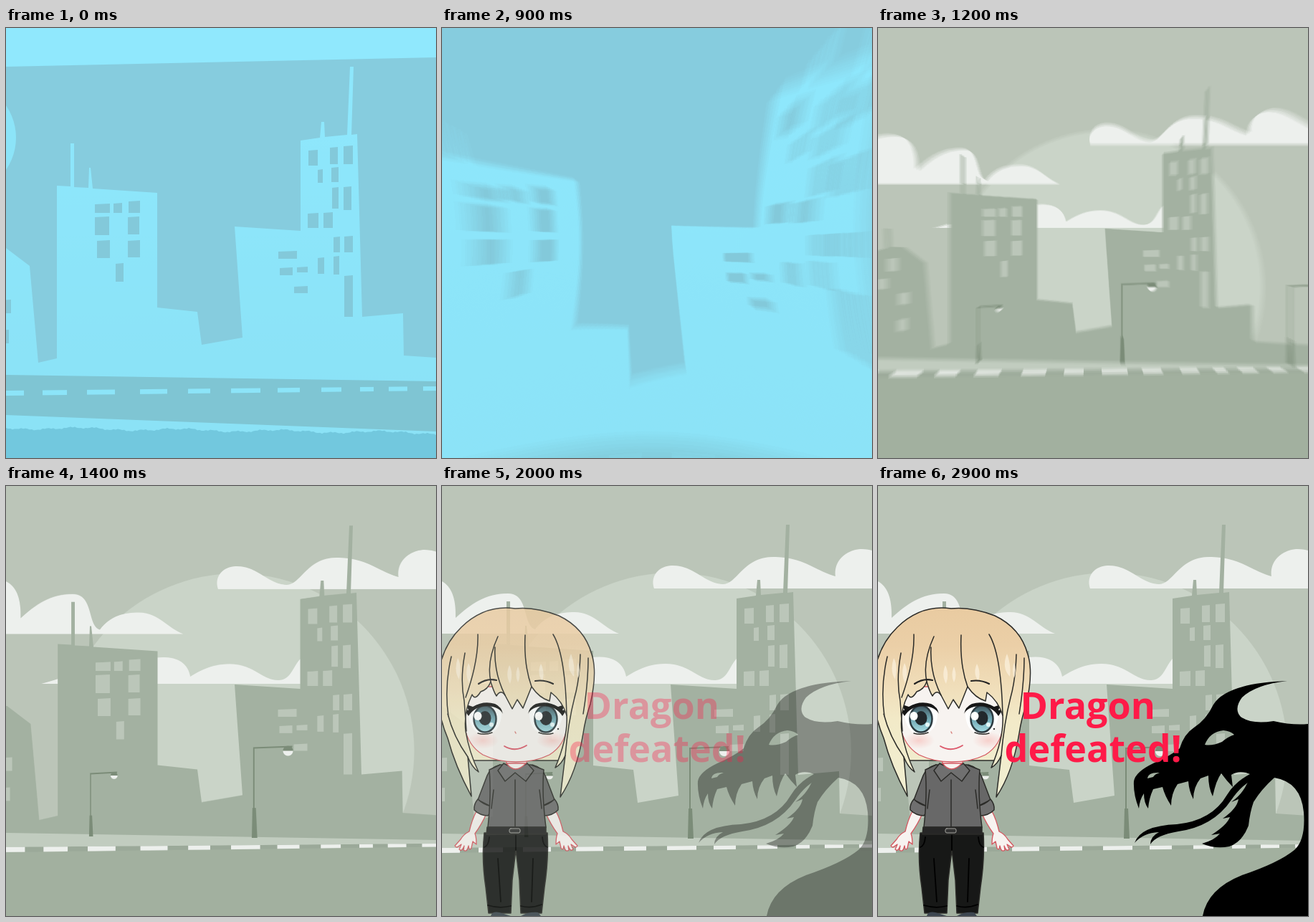
Animation of 600x600 px, one loop 3000 ms. Source, as an HTML page with a canvas:

```html
<!DOCTYPE html>
<html lang="en">
<head>
<meta charset="utf-8">
<title>Dragon defeated</title>
<style>
  html, body { margin: 0; width: 100%; height: 100%; overflow: hidden; background: #bbc5b8; }
  canvas, svg { position: absolute; left: 0; top: 0; width: 100%; height: 100%; display: block; }
  svg text { font: 700 52px "Open Sans", "Noto Sans", sans-serif; fill: #ff1a48; }
  #hero { stroke-linejoin: round; stroke-linecap: round; }
  .line { fill: none; stroke: #2b2b28; stroke-width: 1.5; }
  .ink { stroke: #2b2b28; stroke-width: 1.5; }
  .skin { fill: #f7f3f0; stroke: #d4565f; stroke-width: 1.3; }
</style>
</head>
<body>
<canvas id="stage" width="600" height="600"></canvas>
<svg viewBox="0 0 600 600">
  <defs>
    <linearGradient id="hair" gradientUnits="userSpaceOnUse" x1="0" y1="170" x2="0" y2="434">
      <stop offset="0" stop-color="#e9cba1"/>
      <stop offset=".2" stop-color="#ebcfa7"/>
      <stop offset=".42" stop-color="#f0deba"/>
      <stop offset=".6" stop-color="#f2eac8"/>
      <stop offset="1" stop-color="#f1efd2"/>
    </linearGradient>
    <linearGradient id="iris" x1="0" y1="0" x2="0" y2="1">
      <stop offset="0" stop-color="#40565e"/>
      <stop offset=".5" stop-color="#6fa6b2"/>
      <stop offset="1" stop-color="#a5dbe2"/>
    </linearGradient>
    <radialGradient id="blush">
      <stop offset="0" stop-color="#f6b9b4" stop-opacity=".6"/>
      <stop offset="1" stop-color="#f6b9b4" stop-opacity="0"/>
    </radialGradient>
    <g id="eye">
      <path d="M-24 -8Q-18 -22 0 -23Q18 -22 23 -6Q22 14 8 20H-10Q-21 12 -24 -8Z" fill="#fff"/>
      <ellipse rx="15.5" ry="18.5" fill="url(#iris)" stroke="#2c3a40" stroke-width="2.5"/>
      <ellipse cy="-1" rx="8.5" ry="10" fill="#22282c"/>
      <path d="M-10 20Q0 23 10 19" class="line"/>
      <path d="M25 -7Q20 -17 3 -18Q-14 -18 -23 -4L-29 -13L-23 -12L-26 -20L-17 -17Q-2 -26 14 -21Q23 -17 25 -7Z" fill="#161616"/>
    </g>
    <g id="shine" fill="#fff">
      <ellipse cx="-10" cy="-4" rx="5.5" ry="6"/>
      <circle cx="9" cy="8" r="3" fill="#e4f7f8"/>
    </g>
    <g id="arm">
      <path class="skin" d="M48 454Q42 465 38 482Q30 486 26 493L18 502Q20 506 24 502L27 500L24 507Q28 511 31 502L30 508Q35 512 37 502Q38 510 41 505L43 496L48 500Q48 490 46 485Q56 471 62 457Z"/>
      <path class="ink" fill="#676767" d="M81 389Q67 393 63 404L50 438L68 447L72 425Z"/>
      <path class="ink" fill="#6f6f6f" d="M50 437Q44 444 45 452Q53 460 64 460Q69 456 69 447Q58 445 50 437Z"/>
    </g>
  </defs>

  <g id="hero">
    <path fill="url(#hair)" class="ink" d="M15 250H195L168 383H40Z"/>
    <path class="skin" d="M90 378V400H118V378Z"/>
    <use href="#arm"/>
    <use href="#arm" transform="matrix(-1 0 0 1 207 0)"/>
    <path class="ink" fill="#171817" d="M59 484H147Q149 520 143 560L139 596H110L108 550L103 508L98 550L96 596H65L61 560Q55 520 59 484Z"/>
    <path d="M103 486V508M66 490Q65 502 59 504M140 490Q141 502 147 504M78 520L82 580M127 520L125 580M64 585Q80 590 96 586M110 586Q124 590 139 584" fill="none" stroke="#000" stroke-width="1.8"/>
    <path d="M68 600Q70 593 80 595L96 600ZM110 600Q120 594 134 595L138 600Z" fill="#3d4650"/>
    <path class="ink" fill="#686868" d="M81 389L66 396Q69 430 64 476H145Q139 430 142 396L124 389Z"/>
    <path class="line" d="M102 410V476M72 424Q70 440 69 450M136 424Q138 440 139 450"/>
    <path class="ink" fill="#707070" d="M86 387L78 397L88 412L102 400L117 412L128 397L119 387Q103 397 86 387Z"/>
    <path class="skin" d="M90 387Q102 403 117 387Z"/>
    <path class="ink" fill="#262626" d="M63 476H145V486H62Z"/>
    <rect x="94" y="478" width="15" height="6" rx="2" fill="#333" stroke="#a5a5a0"/>
    <path class="skin" d="M31 280V335Q36 362 57 375Q78 385 103 385Q130 385 150 375Q171 362 175 335V280Z"/>
    <ellipse cx="57" cy="355" rx="22" ry="12" fill="url(#blush)"/>
    <ellipse cx="154" cy="355" rx="22" ry="12" fill="url(#blush)"/>
    <use href="#eye" transform="translate(60 325)"/>
    <use href="#eye" transform="matrix(-1 0 0 1 145 325)"/>
    <use href="#shine" transform="translate(60 325)"/>
    <use href="#shine" transform="translate(145 325)"/>
    <path d="M102 343L103 345" stroke="#d9807c" stroke-width="1.5"/>
    <path d="M87 363Q102 372 118 362" fill="none" stroke="#dc5a6c" stroke-width="1.8"/>
    <circle cx="162" cy="339" r="1.2" fill="#333"/>
    <path class="ink" fill="url(#hair)" d="M102 171Q60 165 27 197Q-2 225 -6 270Q-8 315 8 352Q18 390 41 433L36 378Q42 393 51 399Q38 372 33 342Q30 315 42 291Q46 300 54 287Q64 284 68 273Q72 287 76 293Q82 283 88 292L98 311L105 298L113 310L125 280Q136 296 150 300L152 288Q168 300 174 320Q176 350 158 393Q167 388 172 376L165 434Q188 400 197 345Q200 325 207 304Q217 260 209 235Q199 198 163 181Q130 168 102 171Z"/>
    <path class="line" d="M13 238Q3 280 9 322M32 233Q25 270 31 300Q32 315 34 342M50 207Q51 245 33 295M78 210Q62 245 68 273M74 225Q72 260 88 292M116 208Q114 250 125 280M155 207Q172 235 174 320M193 235Q192 270 185 295Q176 330 172 376M204 240Q204 275 197 318M8 318Q16 350 36 378"/>
    <g fill="#fbf1dc" opacity=".75">
      <path d="M22 240Q28 250 24 270Q16 258 22 240ZM37 247Q43 258 38 275Q31 262 37 247ZM94 250Q100 262 95 276Q88 264 94 250ZM106 252Q111 264 106 274Q101 264 106 252ZM138 248Q144 260 140 272Q132 262 138 248ZM180 234Q186 250 184 266Q172 254 180 234ZM190 246Q194 258 190 268Q186 258 190 246Z"/>
    </g>
    <path d="M51 276Q63 268 76 271M130 272Q143 270 155 276" fill="none" stroke="#222" stroke-width="2.2"/>
  </g>

  <g id="foe">
    <path fill-rule="evenodd" d="M357 412Q359 399 384 387Q409 376 421 366Q427 346 441 337Q458 326 468 305Q486 275 571 272Q527 277 508 295Q496 311 506 322Q521 333 552 328Q578 334 600 332V600H453Q460 562 508 543Q561 525 582 507Q597 492 594 455Q590 413 553 407Q535 423 524 441Q519 455 517 474Q508 497 490 503Q471 507 452 499Q470 494 477 485L465 487Q487 473 491 462L481 464Q501 450 503 437L493 441Q515 425 519 402Q504 396 493 403L495 420Q487 412 479 401Q472 410 467 433Q461 421 461 404L450 408Q440 420 440 437Q434 426 433 412L418 416Q409 429 409 446Q400 432 397 420L384 423Q378 436 377 450Q371 442 371 429Q365 438 364 450Q356 430 357 412ZM456 361Q463 343 482 341Q492 342 497 347Q488 350 480 357Q466 363 456 361ZM376 408Q377 399 393 400Q386 402 384 406Z"/>
    <path d="M519 402Q498 413 487 431Q466 467 417 472Q366 474 358 498Q370 484 392 483Q380 489 380 500Q388 487 419 482Q468 475 493 438Q507 417 528 406Z"/>
  </g>

  <g id="words">
    <text x="198.6" y="324.5">Dragon</text>
    <text x="176.6" y="384.5">defeated!</text>
  </g>
</svg>

<script>
const SIZE = 600, PAD = 150, RES = 2, FULL = (SIZE + 2 * PAD) * RES;
const LOOP = 3000, TICK = 100;

const skyline = new Path2D(`M-150 345L-75 340L-60 318L-43 312L-30 308L-31 277L-24 277L-23 306L0 307L33 332L45 467
  L71 461V220L90 221V161H95V222L115 223L116 195H118L121 224L211 230V390L267 396L273 442L330 432L319 277L411 283V157
  L438 153L440 131H444L445 152L476 149L480 54H485L482 149L490 148L497 403L554 398L555 457L600 460L750 468V700H-150Z`);

const windows = [
  [422,171,13,21], [452,167,11,23], [471,165,13,25], [435,198,7,18], [454,195,10,20], [455,223,9,29],
  [471,222,11,32], [421,259,15,20], [443,258,13,21], [457,292,9,21], [472,291,12,22], [435,321,9,22],
  [457,319,8,25], [472,346,12,57], [380,312,26,10], [382,335,18,10], [406,334,15,7], [402,361,19,9],
  [124,246,21,12], [150,245,12,13], [171,242,16,16], [124,264,20,25], [170,264,16,24], [127,297,18,24],
  [170,297,17,23], [153,329,11,25], [-10,380,17,18], [-12,422,16,18], [-28,325,17,20], [-46,358,18,16]
];
const dashes = [
  [-150,-115], [-84,-48], [-20,25], [51,85], [113,152], [187,225], [254,285], [314,355], [379,410],
  [440,468], [494,513], [534,560], [582,605], [630,655], [680,705]
];
const clouds = [
  "M48 276C100 262 130 245 160 262C190 235 250 225 257 266C275 255 290 248 312 248C345 248 358 271 380 271C400 271 400 250 414 238L430 276Z",
  "M-140 206C-100 150 -60 128 -22 128C10 128 20 150 19 184C40 165 60 150 92 150C122 150 112 195 130 200C145 180 165 176 185 176C212 176 225 198 247 206Z",
  "M296 143C290 125 303 111 322 111C352 111 366 136 392 137C412 137 420 99 462 99C505 99 520 118 549 126C546 100 570 88 585 88C620 88 640 120 720 143Z"
];

function makeScene(paint) {
  const cv = document.createElement("canvas");
  cv.width = cv.height = FULL;
  const g = cv.getContext("2d", { willReadFrequently: true });
  g.scale(RES, RES);
  g.translate(PAD, PAD);
  paint(g);
  return { cv, px: g.getImageData(0, 0, FULL, FULL).data };
}

function poly(g, color, ...pts) {
  g.fillStyle = color;
  g.beginPath();
  for (let i = 0; i < pts.length; i += 2) g.lineTo(pts[i], pts[i + 1]);
  g.fill();
}

function disc(g, color, x, y, r, from = 0, to = 2 * Math.PI) {
  g.fillStyle = color;
  g.beginPath();
  g.arc(x, y, r, from, to);
  g.fill();
}

function paintWindows(g, color) {
  for (const [x, y, w, h] of windows) poly(g, color, x, y, x + w, y - 1, x + w, y + h, x, y + h);
}

// Lines across the stage are given by their heights at x = 0 and x = 600.
const at = (a, b, x) => a + (b - a) * x / SIZE;
function band(g, color, a, b, c, d, x0 = -PAD, x1 = SIZE + PAD) {
  poly(g, color, x0, at(a, b, x0), x1, at(a, b, x1), x1, at(c, d, x1), x0, at(c, d, x0));
}

function paintBlue(g) {
  const light = "#8ce4f8";
  g.fillStyle = "#86ccde";
  g.fillRect(-PAD, -PAD, 900, 900);
  band(g, "#90e8fd", -150, -150, 54, 41);
  disc(g, light, -65, 153, 79);
  const wall = g.createLinearGradient(0, 150, 0, 560);
  wall.addColorStop(0, "#8ee7fc");
  wall.addColorStop(1, "#8be2f6");
  g.fillStyle = wall;
  g.fill(skyline);
  paintWindows(g, "#83c9da");
  band(g, "#7fc5d3", 484, 493, 540, 563);
  for (const [a, b] of dashes) band(g, light, 506, 500, 513, 506, a, b);
  const edge = [];
  for (let x = -PAD; x <= 750; x += 3)
    edge.push(x, at(558, 565, x) + 1.6 * Math.sin(x * .045) + Math.sin(x * .19) + .6 * Math.sin(x * .83));
  poly(g, "#72c8de", ...edge, 750, 750, -PAD, 750);
}

function lamp(g, x, top, foot, reach, s) {
  const dark = "#7b8c78", head = x + reach;
  g.fillStyle = dark;
  g.fillRect(x - s, top, 2 * s, foot - top);
  poly(g, dark, x - s, top, head + 6 * s, top - 2, head + 6 * s, top, x, top + 2);
  poly(g, dark, x - 2 * s, foot - 42 * s, x + 3 * s, foot - 42 * s, x + 5 * s, foot, x - 3 * s, foot);
  disc(g, dark, head, top + 5 * s, 7 * s, Math.PI, 0);
  disc(g, "#edf0ed", head, top + 5 * s, 7 * s, 0, Math.PI);
}

function paintGreen(g) {
  const wall = "#a3b1a1";
  g.fillStyle = "#bbc5b8";
  g.fillRect(-PAD, -PAD, 900, 900);
  disc(g, "#cad4c8", 322, 370, 249);
  g.fillStyle = "#edf0ed";
  for (const c of clouds) g.fill(new Path2D(c));
  g.fillStyle = wall;
  g.fill(skyline);
  paintWindows(g, "#bbc6b9");
  band(g, "#c1ccbf", 485, 495, 505, 500);
  band(g, "#a2b09f", 505, 500, 900, 900);
  band(g, "#9ba999", 505, 500, 512, 504.5);
  for (const [a, b] of dashes) band(g, "#edf0ed", 505, 500, 512, 504.5, a, b);
  lamp(g, 117, 401, 490, 33, .7);
  lamp(g, 346, 365, 492, 48, 1);
  lamp(g, 614, 368, 495, 48, 1);
}

const blue = makeScene(paintBlue), green = makeScene(paintGreen);

// Radial remap with blur: bulge magnifies with radius, shrink scales down evenly.
function warp({ px }, bulge, shrink) {
  const cv = document.createElement("canvas"), taps = 12, half = SIZE / 2;
  cv.width = cv.height = SIZE;
  const g = cv.getContext("2d"), img = g.createImageData(SIZE, SIZE), out = img.data;
  for (let y = 0, o = 0; y < SIZE; y++) {
    for (let x = 0; x < SIZE; x++, o += 4) {
      const dx = x + .5 - half, dy = y + .5 - half, r = Math.hypot(dx, dy);
      let R = 0, G = 0, B = 0;
      for (let i = 0; i < taps; i++) {
        const u = .83 + .34 * i / (taps - 1);
        const k = (1 + shrink * u) / (1 + bulge * u * r);
        const sx = (half + PAD + dx * k) * RES + (i & 1) - .5 | 0;
        const sy = (half + PAD + dy * k) * RES + (i >> 1 & 1) - .5 | 0;
        const p = (sy * FULL + sx) * 4;
        R += px[p]; G += px[p + 1]; B += px[p + 2];
      }
      out[o] = R / taps; out[o + 1] = G / taps; out[o + 2] = B / taps; out[o + 3] = 255;
    }
  }
  g.putImageData(img, 0, 0);
  return cv;
}

const stage = document.getElementById("stage").getContext("2d");
const [hero, foe, words] = ["hero", "foe", "words"].map(id => document.getElementById(id));
const cache = {};

function backdrop(t) {
  if (t >= 600 && t < 1500) {
    cache[t] ||= t <= 1000
      ? warp(blue, .0018 * ((t - 500) / 400) ** 3, 0)
      : warp(green, 0, .143 * ((1500 - t) / 300) ** 3);
    stage.drawImage(cache[t], 0, 0);
  } else {
    const { cv } = t < 600 ? blue : green, o = PAD * RES, s = SIZE * RES;
    stage.drawImage(cv, o, o, s, s, 0, 0, SIZE, SIZE);
  }
}

const fade = (t, start) => Math.min(1, Math.max(0, (t - start) / 600));

let shown = -1;
function draw() {
  const t = Math.floor(performance.now() % LOOP / TICK) * TICK;
  if (t !== shown) {
    shown = t;
    backdrop(t);
    hero.style.opacity = fade(t, 1500);
    foe.style.opacity = words.style.opacity = fade(t, 1800);
  }
  requestAnimationFrame(draw);
}
draw();
</script>
</body>
</html>
```
